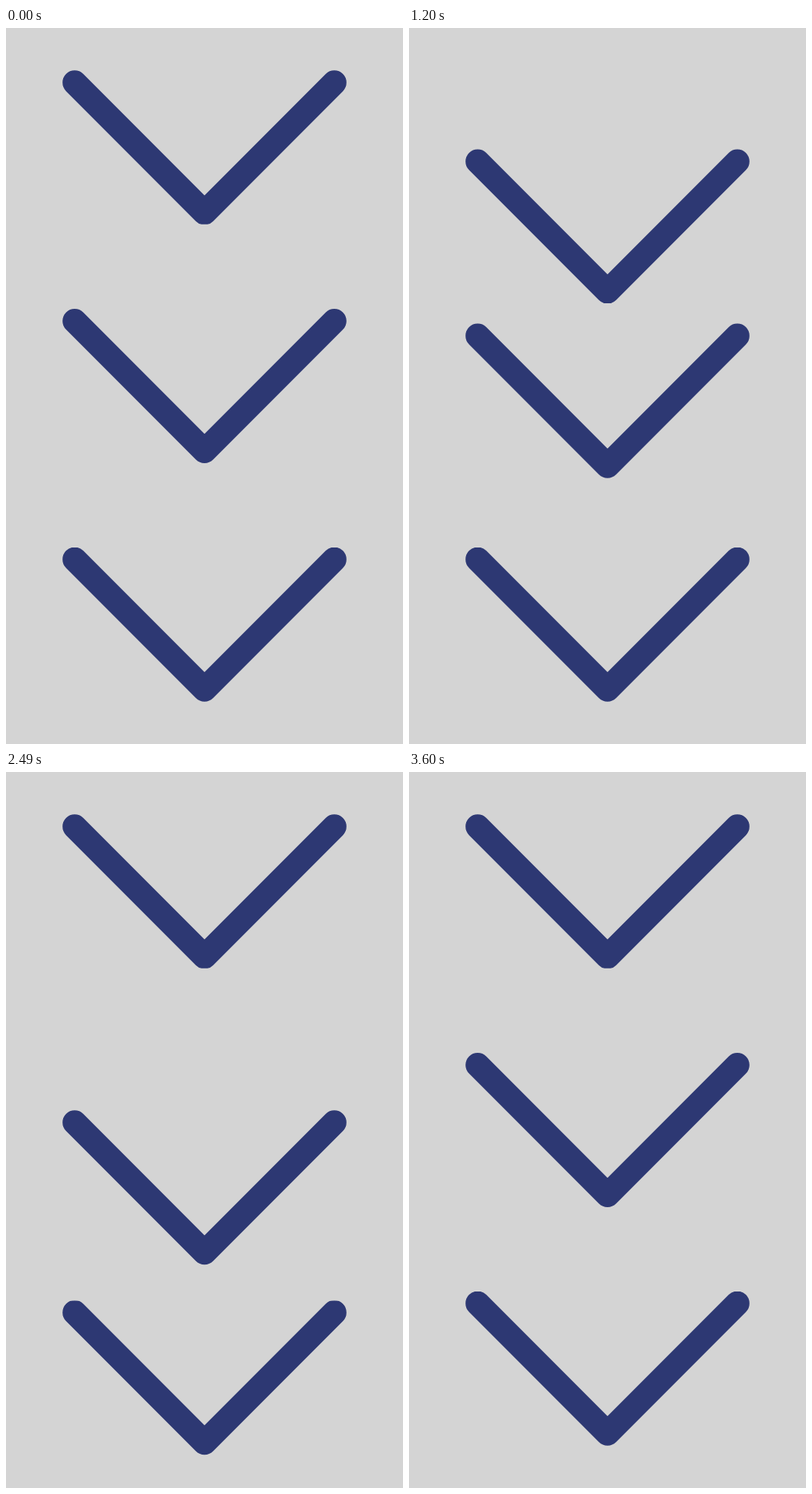
An HTML page with a canvas that plays this animation: 500x900 px, repeating every 4400 ms.

```html
<!DOCTYPE html>
<html lang="en">
<head>
<meta charset="utf-8">
<title>Chevrons</title>
<style>
  html, body { margin: 0; width: 100%; height: 100%; overflow: hidden; background: #d4d4d4; }
  canvas { display: block; }
</style>
</head>
<body>
<canvas id="stage" width="500" height="900"></canvas>
<script>
const ctx = document.getElementById('stage').getContext('2d');
const LOOP = 4400, STEP = 30, LAST_STEP = 120;
const RADIUS = 15.3;

const linear = x => x;

// Cubic Bezier easing, solved for time by bisection.
function bezier(x1, y1, x2, y2) {
  const at = (s, a, b) => 3 * (1 - s) ** 2 * s * a + 3 * (1 - s) * s * s * b + s ** 3;
  return x => {
    let lo = 0, hi = 1;
    for (let i = 0; i < 30; i++) {
      const mid = (lo + hi) / 2;
      if (at(mid, x1, x2) < x) lo = mid; else hi = mid;
    }
    return at((lo + hi) / 2, y1, y2);
  };
}
const softLanding = bezier(0.167, 0.167, 0.667, 1);

// Times are in steps; each chevron sinks, pauses and returns.
const chevrons = [
  { y: 68.6, drop: 99.2, start: 0, low: 37.5, leave: 40, home: 68, ease: softLanding, clip: [-20, 178.2] },
  { y: 368.3, drop: 99.2, start: 33.8, low: 75, leave: 77, home: 99, ease: softLanding, clip: [-20, 200] },
  { y: 667.9, drop: 34.5, start: 75, low: 99, leave: 99, home: 120, ease: linear, clip: [-14.9, 200] }
];

function offset({ drop, start, low, leave, home, ease }, step) {
  if (step <= start || step >= home) return 0;
  if (step < low) return drop * ease((step - start) / (low - start));
  if (step <= leave) return drop;
  return drop * (home - step) / (home - leave);
}

function drawChevron(chevron, step) {
  const [top, bottom] = chevron.clip;
  ctx.save();
  ctx.translate(250, chevron.y + offset(chevron, step));
  ctx.beginPath();
  ctx.rect(-250, top, 500, bottom - top);
  ctx.clip();
  ctx.beginPath();
  ctx.moveTo(-163.5, 0);
  ctx.lineTo(0, 163.5);
  ctx.lineTo(163.5, 0);
  ctx.stroke();
  ctx.restore();
}

function render(time) {
  const step = Math.min(LAST_STEP, Math.floor((time % LOOP) / STEP));
  ctx.fillStyle = '#d4d4d4';
  ctx.fillRect(0, 0, 500, 900);
  ctx.strokeStyle = '#2d3873';
  ctx.lineWidth = RADIUS * 2;
  ctx.lineCap = ctx.lineJoin = 'round';
  chevrons.forEach(chevron => drawChevron(chevron, step));
}

let origin = null;
function tick(now) {
  if (origin === null) origin = now;
  render(now - origin);
  requestAnimationFrame(tick);
}
render(0);
requestAnimationFrame(tick);
</script>
</body>
</html>
```
